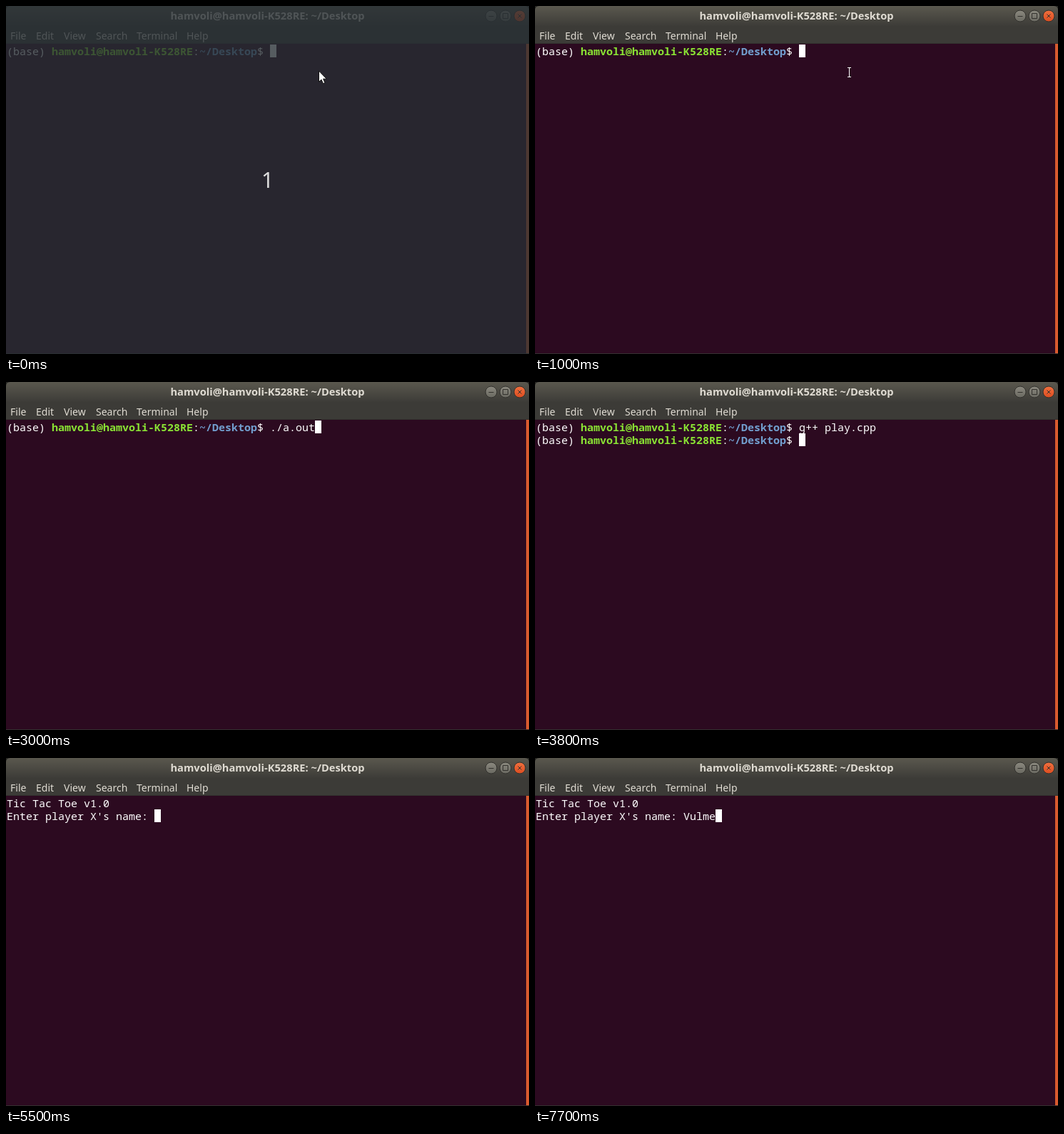
Write an HTML page that moves like this. It is 733 by 488 pixels and loops after 8000 ms.

```html
<!DOCTYPE html>
<html lang="en">
<head>
<meta charset="utf-8">
<title>Terminal session</title>
<style>
  html, body { margin: 0; width: 100%; height: 100%; overflow: hidden; background: #2c0a20; }
  svg { display: block; }
  text { white-space: pre; font-family: "Noto Sans", sans-serif; font-size: 14px; fill: #dfdbd2; }
  .title { font-size: 14.67px; font-weight: bold; text-anchor: middle; }
  .line { font-family: "Noto Sans Mono", monospace; font-size: 15px; fill: #fff; }
  .user { font-weight: bold; fill: #8ae234; }
  .path { font-weight: bold; fill: #729fcf; }
  .count { font-size: 30px; text-anchor: middle; fill: #dcdcdc; }
</style>
</head>
<body>
<svg width="733" height="488" viewBox="0 0 733 488">
  <defs>
    <linearGradient id="bar" x2="0" y2="1">
      <stop offset="0" stop-color="#5a584e"/>
      <stop offset="1" stop-color="#3c3b37"/>
    </linearGradient>
    <linearGradient id="grey" x2="0" y2="1">
      <stop offset="0" stop-color="#8b897f"/>
      <stop offset="1" stop-color="#6a6961"/>
    </linearGradient>
    <linearGradient id="orange" x2="0" y2="1">
      <stop offset="0" stop-color="#f0703f"/>
      <stop offset="1" stop-color="#dd4d20"/>
    </linearGradient>
  </defs>

  <rect width="733" height="488" fill="#2c0a20"/>
  <rect width="733" height="10" fill="#242420"/>
  <path d="M0 29V6Q0 0 6 0H727Q733 0 733 6V29Z" fill="url(#bar)"/>
  <rect y="28" width="733" height="25" fill="#3c3b37"/>
  <rect y="52" width="733" height="1" fill="#33322e"/>
  <rect x="729" y="53" width="4" height="434" fill="#d95b2e"/>
  <rect y="487" width="733" height="1" fill="#33302f"/>
  <text class="title" x="366.5" y="19">hamvoli@hamvoli-K528RE: ~/Desktop</text>
  <g id="menu"></g>
  <g stroke="#32312d">
    <circle cx="680" cy="14" r="8" fill="url(#grey)"/>
    <circle cx="700" cy="14" r="8" fill="url(#grey)"/>
    <circle cx="720" cy="14" r="8" fill="url(#orange)"/>
    <path d="M676.5 14.5H683.5M696.5 10.5H703.5V17.5H696.5ZM717.5 11.5L722.5 16.5M722.5 11.5L717.5 16.5" fill="none"/>
  </g>

  <rect id="cursor" width="9" height="18" fill="#fff"/>
  <text class="line" x="1" y="69"></text>
  <text class="line" x="1" y="87"></text>
  <path id="beam" d="M438 86.5H443M440.5 86V100M438 99.5H443" stroke="#fff" fill="none"/>

  <g id="countdown">
    <rect width="733" height="488" fill="#272f34" fill-opacity=".78"/>
    <text class="count" x="366.5" y="255">1</text>
    <path d="M438.5 91V106.5L442 103.2L444.5 108.8L447 107.7L444.6 102.2H449.3Z" fill="#fff" stroke="#111"/>
  </g>
</svg>
<script>
const $ = id => document.getElementById(id);
const LOOP = 8000, CELL = 9, ROW = 18;
const lines = document.querySelectorAll('.line');

const menu = { File: 6, Edit: 42, View: 81, Search: 126, Terminal: 183, Help: 253 };
$('menu').innerHTML = Object.entries(menu)
  .map(([label, x]) => `<text x="${x}" y="47">${label}</text>`).join('');

const PROMPT = '(base) <tspan class="user">hamvoli@hamvoli-K528RE</tspan>:' +
  '<tspan class="path">~/Desktop</tspan>$ ';
const BUILD = 'g++ play.cpp ';
const ask = name => ['Tic Tac Toe v1.0', "Enter player X's name: " + name];
const shell = command => PROMPT + command;

// Each step: start time, screen lines, whether the block cursor is lit.
const steps = [
  [0, [shell('')], true],
  [400, [shell('')], false],
  [1000, [shell('')], true],
  [2000, [shell('clear')], true],
  [3000, [shell('./a.out')], true],
  [3400, [shell(BUILD)], true],
  [3700, [shell(BUILD), ''], true],
  [3800, [shell(BUILD), shell('')], true],
  [4300, [shell(BUILD), shell(BUILD)], true],
  [4500, [shell(BUILD), shell('clear')], true],
  [5000, [shell(BUILD), shell('clear')], false],
  [5100, [shell(BUILD), shell('./a.out')], true],
  [5500, ask(''), true],
  [5700, ask(''), false],
  [6500, ask(''), true],
  [7000, ask('V'), true],
  [7300, ask('Vul'), true],
  [7400, ask('Vulm'), true],
  [7700, ask('Vulme'), true]
];

const show = (id, on) => $(id).setAttribute('visibility', on ? 'visible' : 'hidden');
let current;

function draw(t) {
  show('countdown', t < 400);
  show('beam', t >= 400 && t < 1900);
  const step = steps.findLast(([start]) => start <= t);
  if (step === current) return;
  current = step;
  const [, content, lit] = step;
  lines.forEach((line, i) => line.innerHTML = content[i] || '');
  const row = content.length - 1;
  $('cursor').setAttribute('x', 1 + CELL * lines[row].textContent.length);
  $('cursor').setAttribute('y', 54 + ROW * row);
  show('cursor', lit);
}

const begin = performance.now();
function tick() {
  draw((performance.now() - begin) % LOOP);
  requestAnimationFrame(tick);
}
tick();
</script>
</body>
</html>
```
